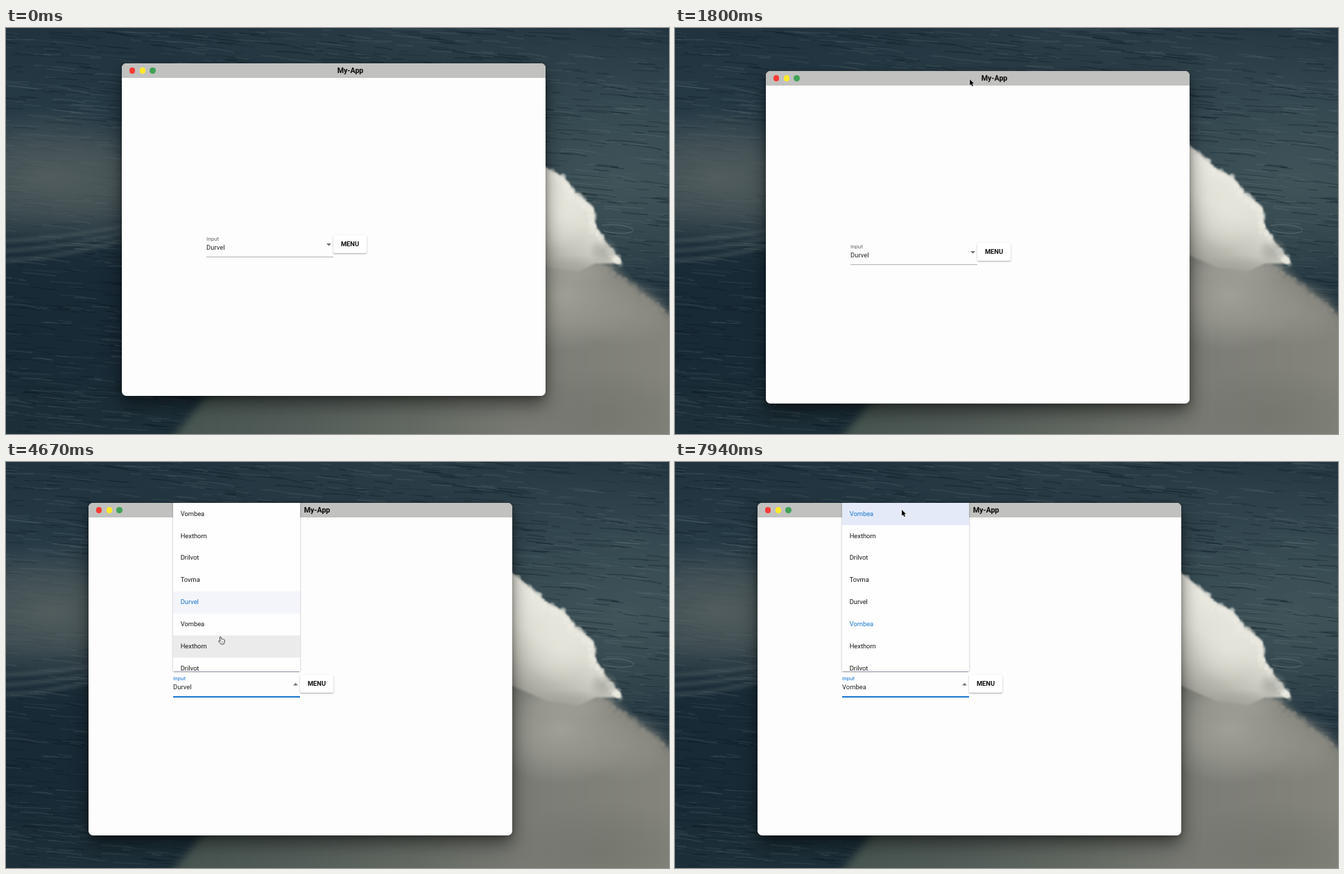
Animation, 956 px wide and 586 px high, one loop 8000 ms. Source, as an HTML page with a canvas:

```html
<!DOCTYPE html>
<html lang="en">
<head>
<meta charset="utf-8">
<title>My-App</title>
<style>
  html, body { margin: 0; width: 100%; height: 100%; overflow: hidden; background: #1d3040; }
  body { position: relative; font: 9.33px/12px Roboto, sans-serif; color: rgba(0,0,0,.87); }
  body * { box-sizing: border-box; }
  canvas { position: absolute; left: 0; top: 0; }

  /* every animation shares one 8 s clock */
  .win, .ptr, .arrow, .hand, .menu, .edge, .hover, .caret, .focus, .line, .label, .was, .now, .pick, .drop {
    animation: 8s linear infinite;
  }
  .arrow, .hand, .hover, .label, .was, .now, .pick, .drop, .focus { animation-timing-function: step-end; }

  .win { position: absolute; left: 0; top: 0; width: 611px; height: 480px; border-radius: 6.5px;
    box-shadow: 0 12px 26px rgba(0,0,0,.5), 0 2px 8px rgba(0,0,0,.25), 0 0 1px rgba(0,0,0,.5);
    animation-name: win; }
  .page { position: absolute; inset: 0; border-radius: 6.5px; overflow: hidden; background: #fdfdfd; }
  .page > * { position: absolute; }
  .bar { left: 0; top: 0; width: 100%; height: 21px; background: #c1c1bf; }
  .bar i { position: absolute; top: 6.3px; width: 8.4px; height: 8.4px; border-radius: 50%; }
  .title { left: 269px; width: 121px; top: 3px; line-height: 15px; text-align: center;
    font-size: 10.67px; font-weight: 700; color: #080808; }

  .label { left: 122px; top: 248px; font-size: 8px; color: rgba(0,0,0,.6); animation-name: label; }
  .value { left: 122px; top: 260px; letter-spacing: .009em; }
  .was { animation-name: was; }
  .now { animation-name: now; }
  .rule { left: 122px; top: 279px; width: 183px; height: 1px; background: rgba(0,0,0,.3); }
  .line { left: 122px; top: 278.5px; width: 183px; height: 1.5px; background: #1976d2; animation-name: line; }
  .caret { left: 294.5px; top: 259.5px; width: 7px; height: 3.5px; background: #6b6b6b;
    clip-path: polygon(0 0, 100% 0, 50% 100%); animation-name: caret; }
  .btn { left: 305px; top: 248px; width: 48px; height: 26px; border-radius: 2px; background: #fff;
    line-height: 26px; text-align: center; font-weight: 700; color: #111;
    box-shadow: 0 1px 3px rgba(0,0,0,.22), 0 1px 1px rgba(0,0,0,.16); }

  .menu { left: 122px; top: -.4px; width: 183px; height: 243.4px; overflow: hidden; background: #fefefe;
    animation-name: menu; }
  .edge { left: 122px; top: -6px; width: 183px; height: 249px; border-radius: 2px;
    box-shadow: 0 1px 3px rgba(0,0,0,.25), 0 1px 1px rgba(40,40,100,.3); animation-name: menu; }
  .menu p { position: relative; margin: 0; height: 31.9px; line-height: 32px; padding-left: 10.7px; color: #161616; }
  .hover, .focus { position: absolute; left: 0; top: 0; width: 100%; height: 31.9px; }
  .hover { background: #ebebec; animation-name: hover; }
  .focus { background: #f4f5fb; animation-name: focus; }
  .menu .pick { animation-name: pick; }
  .menu .drop { animation-name: drop; }

  .ptr { position: absolute; left: 0; top: 0; animation-name: ptr; }
  .ptr svg { position: absolute; overflow: visible; width: 12px; height: 14px; }
  .arrow { animation-name: arrow; }
  .hand { left: -3px; animation-name: hand; }

  @keyframes win {
    0%, 13.75% { transform: translate(167px, 51px); }
    22.5% { transform: translate(131px, 62px); }
    25%, 33.375% { transform: translate(126px, 63px); }
    35% { transform: translate(148px, 58px); }
    38.75% { transform: translate(182px, 53px); }
    46.25%, 100% { transform: translate(119px, 59px); }
  }
  @keyframes ptr {
    0%, 1.75% { transform: translate(620px, 592px); }
    10% { transform: translate(475px, 71px); }
    11.75% { transform: translate(472px, 67px); }
    13.75% { transform: translate(461px, 63px); }
    22.5% { transform: translate(425px, 74px); }
    25% { transform: translate(420px, 75px); }
    30.875%, 33.375% { transform: translate(495px, 76px); }
    35% { transform: translate(517px, 71px); }
    38.75% { transform: translate(551px, 66px); }
    46.25% { transform: translate(488px, 72px); }
    52%, 52.5% { transform: translate(337px, 318px); }
    58.375% { transform: translate(309px, 252px); }
    62.5% { transform: translate(306px, 150px); }
    68.75% { transform: translate(308px, 236px); }
    72.5%, 76.25% { transform: translate(308px, 238px); }
    83.75%, 88.125% { transform: translate(338px, 315.5px); }
    95% { transform: translate(327px, 72px); }
    99.25%, 100% { transform: translate(327px, 69px); }
  }
  @keyframes arrow { 0% { opacity: 1; } 51.5% { opacity: 0; } 94.7%, 100% { opacity: 1; } }
  @keyframes hand { 0% { opacity: 0; } 51.5% { opacity: 1; } 94.7%, 100% { opacity: 0; } }
  @keyframes menu {
    0%, 52.5% { opacity: 0; } 56%, 72.5% { opacity: 1; }
    76%, 85.625% { opacity: 0; } 88.9%, 100% { opacity: 1; }
  }
  @keyframes caret {
    0%, 52.5% { transform: none; } 56%, 72.5% { transform: rotate(180deg); }
    76%, 85.625% { transform: none; } 88.9%, 100% { transform: rotate(180deg); }
  }
  @keyframes line { 0%, 52.5% { transform: scaleX(0); } 56.5%, 100% { transform: none; } }
  @keyframes label { 0% { color: rgba(0,0,0,.6); } 52.5%, 100% { color: #1976d2; } }
  @keyframes was { 0% { opacity: 1; } 72.5%, 100% { opacity: 0; } }
  @keyframes now { 0% { opacity: 0; } 72.5%, 100% { opacity: 1; } }
  @keyframes pick { 0% { color: #161616; } 76%, 100% { color: #1976d2; } }
  @keyframes drop { 0% { color: #1976d2; } 76%, 100% { color: #161616; } }
  @keyframes focus { 0% { transform: translateY(400%); } 76%, 100% { transform: none; } }
  @keyframes hover {
    0% { transform: translateY(800%); }
    53.9% { transform: translateY(700%); }
    55.6% { transform: translateY(600%); }
    58.42% { transform: translateY(500%); }
    59.7% { transform: translateY(400%); }
    61% { transform: translateY(300%); }
    62.3% { transform: translateY(200%); }
    62.86% { transform: translateY(300%); }
    65.2% { transform: translateY(400%); }
    67.5% { transform: translateY(500%); }
    77% { transform: translateY(800%); }
    88.5% { transform: translateY(700%); }
    89% { transform: translateY(600%); }
    89.9% { transform: translateY(500%); }
    90.8% { transform: translateY(400%); }
    91.7% { transform: translateY(300%); }
    92.6% { transform: translateY(200%); }
    93.5% { transform: translateY(100%); background: #ebebec; }
    94.4%, 100% { transform: none; background: #e5eaf9; }
  }
</style>
</head>
<body>
<canvas id="sea" width="956" height="586"></canvas>

<div class="win"><div class="page">
  <div class="bar">
    <i style="left:10.8px;background:#f83a34"></i>
    <i style="left:25.6px;background:#ffe92a"></i>
    <i style="left:40.4px;background:#3fa256"></i>
  </div>
  <div class="title">My-App</div>
  <div class="label">Input</div>
  <div class="value was">Durvel</div>
  <div class="value now">Vombea</div>
  <div class="rule"></div>
  <div class="line"></div>
  <div class="caret"></div>
  <div class="btn">MENU</div>
  <div class="edge"></div>
  <div class="menu">
    <div class="focus"></div>
    <div class="hover"></div>
    <p class="pick">Vombea</p>
    <p>Hexthorn</p>
    <p>Drilvot</p>
    <p>Tovma</p>
    <p class="drop">Durvel</p>
    <p class="pick">Vombea</p>
    <p>Hexthorn</p>
    <p>Drilvot</p>
  </div>
</div></div>

<div class="ptr">
  <svg class="arrow" viewBox="0 0 12 14">
    <path d="M0 0V8.6L2 6.9L3.4 10L4.9 9.4L3.5 6.3H6.2Z" fill="#000" stroke="#fff" stroke-width=".9" paint-order="stroke"/>
  </svg>
  <svg class="hand" viewBox="0 0 12 14">
    <path d="M2.2 1.1Q3.2-.2 4.1 1.1L4.9 4Q6 3.4 6.5 4.2Q7.6 3.8 8 4.7Q9.2 4.5 9.3 5.7L9.2 8.3L8 11H3.9L.7 7.5Q.3 6.2 1.6 6.2L3 7.1Z" fill="#fff" stroke="#222" stroke-width=".9"/>
    <path d="M5.2 7V9M6.8 7V9" stroke="#444" stroke-width=".6"/>
  </svg>
</div>

<script>
const c = document.getElementById('sea').getContext('2d');

let seed = 7;
const rnd = () => (seed = seed * 16807 % 2147483647) / 2147483647;

function blob(x, y, rx, ry, rgb, a) {
  c.save();
  c.translate(x, y);
  c.scale(rx, ry);
  const g = c.createRadialGradient(0, 0, 0, 0, 0, 1);
  g.addColorStop(0, `rgba(${rgb},${a})`);
  g.addColorStop(.5, `rgba(${rgb},${a * .6})`);
  g.addColorStop(1, `rgba(${rgb},0)`);
  c.fillStyle = g;
  c.fillRect(-1, -1, 2, 2);
  c.restore();
}

function fade(x1, y1, x2, y2, ...colors) {
  const g = c.createLinearGradient(x1, y1, x2, y2);
  colors.forEach((col, i) => g.addColorStop(i / (colors.length - 1), col));
  return g;
}

function shape(points, fill, blur) {
  c.filter = `blur(${blur}px)`;
  c.fillStyle = fill;
  c.beginPath();
  points.forEach(p => c.lineTo(...p));
  c.fill();
  c.filter = 'none';
}

// ragged spray along a line of points
function puffs(points, spread, size, rgb) {
  c.filter = 'blur(.8px)';
  points.slice(1).forEach(([x2, y2], i) => {
    const [x1, y1] = points[i], n = Math.hypot(x2 - x1, y2 - y1) * 1.2;
    for (let k = 0; k < n; k++) {
      c.fillStyle = `rgba(${rgb},${.2 + rnd() * .4})`;
      c.beginPath();
      c.arc(x1 + (x2 - x1) * k / n - rnd() * spread, y1 + (y2 - y1) * k / n + (rnd() - .3) * spread,
        .6 + rnd() * size, 0, 7);
      c.fill();
    }
  });
  c.filter = 'none';
}

// deep water
c.fillStyle = fade(0, 0, 0, 586, '#20333e', '#263a46', '#2b3e47', '#182a36', '#182a36', '#1d2f38');
c.fillRect(0, 0, 956, 586);
blob(900, 220, 380, 230, '72,92,96', .7);
blob(620, 30, 400, 110, '56,74,80', .4);

// ripples: fine, denser and steeper toward the right
for (let i = 0; i < 2600; i++) {
  const x = rnd() * 1020 - 60, y = rnd() * 586, len = 10 + rnd() * 50;
  c.strokeStyle = rnd() < .52 ? 'rgba(8,20,28,.3)' : 'rgba(122,142,144,.16)';
  c.lineWidth = .6 + rnd() * 1.3;
  c.beginPath();
  c.moveTo(x, y);
  c.quadraticCurveTo(x + len / 2, y - 1 + rnd() * 4, x + len, y + len * (.03 + rnd() * .12));
  c.stroke();
}

// misty swell on the left
blob(60, 215, 190, 100, '88,98,98', .85);
blob(150, 225, 110, 80, '84,94,94', .4);
c.filter = 'blur(2.5px)';
c.strokeStyle = 'rgba(112,122,120,.4)';
c.lineWidth = 4;
[0, 14, 28].forEach(d => {
  c.beginPath();
  c.moveTo(-5, 308 + d);
  c.quadraticCurveTo(90, 303 + d, 190, 282 + d * .6);
  c.stroke();
});
c.filter = 'none';

// spray
const slope = [[800, 300], [866, 345], [916, 380], [980, 432]];
shape([[290, 530], [600, 500], [720, 320], ...slope, [980, 610], [225, 610]],
  fade(230, 0, 956, 0, '#46544f', '#525c58', '#646a63', '#7c7d76', '#84847b'), 6);
puffs(slope.slice(1), 14, 5, '132,132,124');
blob(800, 385, 110, 80, '172,171,162', .75);
blob(890, 410, 80, 50, '152,151,142', .6);
blob(860, 560, 150, 70, '108,110,102', .5);

// breaking crest
const crest = [[700, 138], [742, 171], [786, 208], [806, 217], [821, 239], [847, 258],
  [850, 285], [866, 310], [889, 340]];
shape([...crest, [850, 340], [826, 351], [780, 345], [700, 310]],
  fade(826, 232, 768, 346, '#e8e7de', '#deddd3', '#c4c3b9', '#a09f97'), 1.6);
puffs(crest, 9, 4, '236,235,226');
blob(795, 270, 45, 50, '236,235,226', .5);
blob(862, 322, 22, 20, '150,152,146', .6);
blob(815, 350, 70, 22, '160,159,151', .7);

// foam ring
c.strokeStyle = 'rgba(140,152,150,.55)';
c.lineWidth = .8;
c.beginPath();
c.ellipse(880, 290, 25, 6, .08, -2.6, 2.4);
c.stroke();
</script>
</body>
</html>
```
